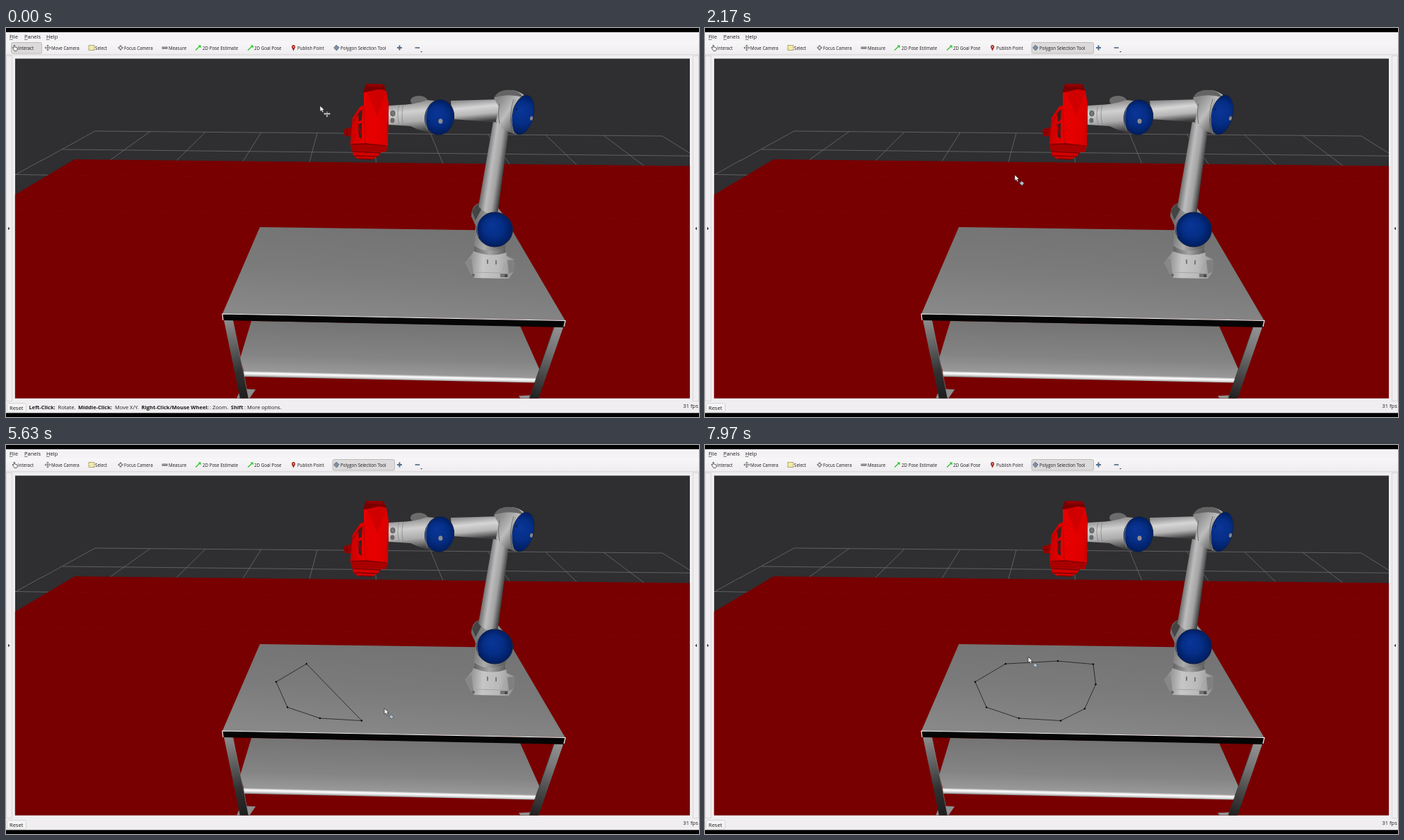
An HTML page with a canvas that plays this animation: 980x551 px, repeating every 8 s.

```html
<!DOCTYPE html>
<html lang="en">
<head>
<meta charset="utf-8">
<title>Polygon selection</title>
<style>
html, body { margin: 0; width: 100%; height: 100%; overflow: hidden; background: #000; }
canvas { display: block; width: 980px; height: 551px; }
</style>
</head>
<body>
<canvas id="stage" width="980" height="551"></canvas>
<script>
const LOOP = 8000, TOOL_CLICK = 1450;
const VIEW = [12.8, 43.2, 954.3, 481.4];
const stage = document.getElementById('stage').getContext('2d');
const FONT = '"Open Sans", "Noto Sans", sans-serif';
let c;

// Drawing helpers
function shape(d, fill, line, width = 1) {
  const p = new Path2D(d);
  if (fill) { c.fillStyle = fill; c.fill(p); }
  if (line) { c.strokeStyle = line; c.lineWidth = width; c.stroke(p); }
}
function rect(x, y, w, h, fill) { c.fillStyle = fill; c.fillRect(x, y, w, h); }
function oval(x, y, rx, ry, fill, turn = 0, line) {
  c.beginPath();
  c.ellipse(x, y, rx, ry, turn, 0, Math.PI * 2);
  c.fillStyle = fill;
  c.fill();
  if (line) { c.strokeStyle = line; c.lineWidth = 1; c.stroke(); }
}
function stops(g, colors) {
  colors.forEach((col, i) => g.addColorStop(i / (colors.length - 1), col));
  return g;
}
const lin = (x0, y0, x1, y1, ...cols) => stops(c.createLinearGradient(x0, y0, x1, y1), cols);
function text(s, x, y, size, bold) {
  c.font = `${bold ? 'bold ' : ''}${size}px ${FONT}`;
  c.fillStyle = '#1c1c1c';
  c.fillText(s, x, y);
}

function drawRoom() {
  rect(...VIEW, '#2f2e31');
  const grid = '#747476';
  for (let i = 0; i <= 10; i++) {
    const x = 126 + 77.4 * i + 0.28 * i * i, y = 146 + 0.7 * i;
    shape(`M${x} ${y}L${50 + 94.7 * i} ${188 + 0.8 * i}`, null, grid, 0.7);
  }
  shape('M126 146L928 153M80 172L990 181.5M13 207.5L75 208.5M51 187L13 208', null, grid, 0.7);
  shape('M97 186L968 195.5V525H12V236.5Z', '#780000');
  c.setLineDash([14, 5, 3, 7]);
  shape('M76 208.5L967 218M13 258L967 271', null, 'rgba(160,25,25,.28)', 0.7);
  c.setLineDash([]);
}

function drawTable() {
  shape('M326 525L332 511L353 512L344 525Z', '#8d8d8d');
  shape('M725 521L748 520L742 525H728Z', '#929292');
  shape('M347 415L727 422L755 485L750 496L337 488L331 468Z',
    lin(530, 418, 528, 492, '#747474', '#7c7c7c', '#848484', '#9a9a9a'));
  shape('M336 486L750 495.5L749 502.5L337 494Z',
    lin(500, 489.5, 499.8, 498, '#a6a6a6', '#fff', '#d4d4d4', '#747474'));
  shape('M308 413L321 414L343 525H331Z', lin(310, 415, 340, 524, '#8c8c8c', '#606060', '#303030', '#1d1d1d'));
  shape('M321 415L343 524', null, '#8b8b8b', 0.6);
  shape('M775 423L788 424L753 525H740Z', lin(782, 424, 747, 524, '#929292', '#747474', '#494949', '#202020'));
  shape('M775 424L740 524', null, '#333', 0.7);
  shape('M359 282L716 287L790.5 414L306 405Z',
    lin(520, 284, 510, 412, '#747474', '#7b7b7b', '#888'));
  shape('M306 405L791 414.5L789 424L307 414Z', '#050505');
  shape('M307 414L306 405L791 414.5L789 423', null, '#f3f3f3', 1.2);
}

function blueCap(x, y, rx, ry, turn) {
  const g = c.createRadialGradient(x - 4, y - 6, 2, x, y, Math.max(rx, ry));
  oval(x, y, rx, ry, stops(g, ['#0a3596', '#052e86', '#001c5c']), turn, '#17233f');
}

function drawArm() {
  // Base
  shape('M663 306L706 309L708 323L719 328L718 345L711 355L662 354L649 332L660 319Z',
    lin(652, 330, 719, 335, '#858585', '#c6c6c6', '#bababa', '#929292'));
  shape('M649 332L658 326L662 354L656 347Z', '#888');
  shape('M663 306L706 309L707 318Q686 326 661 316Z', lin(661, 310, 707, 312, '#606060', '#a5a5a5', '#5c5c5c'));
  shape('M662 346L701 347L706 334L717 332', null, '#a0a0a0', 0.8);
  shape('M709 329L719 328L718 345L711 348Z', '#808080');
  shape('M681 328v6M693 329v6', null, '#777', 2);
  rect(699, 348, 11, 5, '#737373');
  oval(661, 350, 2, 2, '#666');
  oval(707, 351, 2, 2, '#444');
  // Shoulder and upper arm
  shape('M658 267Q658 249 673 247L694 253L704 265L707 310Q679 322 662 308L664 280Z',
    lin(660, 280, 705, 290, '#6c6c6c', '#adadad', '#666'));
  shape('M659 260Q664 247 676 247L671 259L664 272Z', '#444');
  shape('M689 132L712 136L695 265Q680 266 668 253Z',
    lin(676, 205, 703, 209, '#707070', '#bdbdbd', '#a2a2a2', '#3c3c3c'));
  // Elbow and forearm
  shape('M629 103L699 101L699 134L631 129Z',
    lin(660, 102, 663, 133, '#929292', '#d6d6d6', '#b5b5b5', '#3e3e3e'));
  shape('M690 99Q696 88 711 88Q724 87 735 97L722 151Q700 145 693 132L697 112Z',
    lin(694, 105, 728, 130, '#8a8a8a', '#bdbdbd', '#606060'));
  shape('M690 99Q697 86 714 88Q727 89 731 98Q710 92 690 99Z', '#646464');
  shape('M698 107Q695 120 698 136M718 101Q711 121 715 145', null, '#686868', 0.9);
  blueCap(731, 123, 15, 28.5, 0.24);
  shape('M721 101Q711 125 718 149', null, '#8c8c8c', 0.8);
  oval(743, 128, 2, 3, '#858585', 0.2);
  oval(722, 115, 1, 1.4, '#061a48');
  blueCap(691, 285.5, 25.5, 24.5, 0);
  shape('M668 296Q661 274 679 263', null, '#999', 0.7);
  // Wrist
  oval(584, 103, 12, 7, '#6b6b6b');
  shape('M541 110L556 109Q576 109 596 102L614 104L607 150Q588 147 572 139L541 137Z',
    lin(570, 104, 574, 147, '#8c8c8c', '#d0d0d0', '#adadad', '#444'));
  shape('M556 109Q552 122 556 137M562 109Q558 122 562 138', null, '#888', 0.8);
  oval(547, 121, 3.2, 3.8, '#777', 0, '#555');
  oval(546.5, 131, 3, 3.4, '#696969');
  blueCap(613, 126.5, 20.5, 25, 0.15);
  shape('M601 104Q589 122 596 145', null, '#999', 0.7);
  oval(614.5, 132, 3, 3.5, '#8c8c8c');
  oval(598, 131, 1, 1, '#071b48');
  oval(628, 112, 1, 1, '#071b48');
}

function drawGripper() {
  shape('M477 144L489 140L490 154L479 153Z', '#980000');
  shape('M482 143v10M477 148h8', null, '#700000', 0.8);
  shape('M506 91L510 79L534 80L538 90L541 107L540 167L537 176L489 174L487 164L490 127L501 111L506 110Z',
    lin(488, 130, 541, 134, '#c80000', '#e40000', '#e60000', '#d80000'));
  shape('M505 91L509 79L534 80L538 89L527 87L510 91Z', '#780000');
  shape('M509 79L534 80L532 84L511 83Z', '#900000');
  shape('M511 92L525 125L538 91L527 87Z', '#d00000');
  shape('M498 121L504 115L503 130L499 133ZM498 137L503 134L503 157L499 154Z', '#3c2020');
  shape('M491 133L501 116M497 135L503 151', null, '#a80000', 1.4);
  shape('M506 112L508 163M541 106L538 160', null, '#c00000', 1);
  shape('M488 164L509 163L539 167L537 176L489 174Z', '#a80000');
  shape('M488 165L509 164L539 167', null, '#700000', 1.2);
  shape('M490 174L530 176L526 182L518 186L499 186L491 181Z', '#d40000');
  shape('M490 175L530 177M492 181L526 182M499 185L518 186', null, '#800000', 1.3);
}

const TOOLS = [
  ['Interact', 17], ['Move Camera', 64], ['Select', 126], ['Focus Camera', 167],
  ['Measure', 230], ['2D Pose Estimate', 278], ['2D Goal Pose', 351],
  ['Publish Point', 412], ['Polygon Selection Tool', 473]
];

function button(x, w, fill, line) {
  c.beginPath();
  c.roundRect(x + 0.5, 20.5, w, 15.5, 2);
  c.fillStyle = fill;
  c.fill();
  c.strokeStyle = line;
  c.lineWidth = 0.8;
  c.stroke();
}

function drawIcons() {
  shape('M11 31L9 27.5L11 28V24.5L12.5 24.5V27L16 28V31L15 32.5H12Z', '#fafafa', '#454545', 0.8);
  shape('M55 28H63M59 24V32M57.5 25.5L59 24L60.5 25.5M57.5 30.5L59 32L60.5 30.5M56.5 26.5L55 28L56.5 29.5M61.5 26.5L63 28L61.5 29.5', null, '#565656', 0.8);
  c.setLineDash([1.5, 1]);
  shape('M117 24.5H125V31.5H117Z', '#f3e9a6', '#655d35', 0.8);
  c.setLineDash([]);
  oval(162, 28, 2.4, 2.4, '#eee', 0, '#777');
  shape('M158 28H161M163 28H166M162 24V27M162 29V32', null, '#666', 0.9);
  rect(220.5, 26.5, 8, 3.2, '#777');
  shape('M222 27v1.3M224 27v1.3M226 27v1.3', null, '#eee', 0.6);
  for (const x of [268, 342]) {
    shape(`M${x} 31.5L${x + 7} 25M${x + 4} 25H${x + 7}V28`, null, '#26c526', 1.2);
  }
  shape('M406.5 32.5L404 27.5Q403.7 24 406.5 24Q409.3 24 409 27.5Z', '#a62a20');
  oval(406.5, 26.7, 1, 1, '#e9c3bd');
  shape('M463.7 28L467 24.3L471 27.7L467.5 32Z', '#7f91a8', '#4c5b70', 0.8);
  shape('M553 28H560M556.5 24.5V31.5', null, '#55708d', 2);
  shape('M578.5 28H585', null, '#63768a', 1.8);
  shape('M586 33H589L587.5 34.6Z', '#444');
}

function drawWindow(polygonMode, hover) {
  rect(0, 0, 980, 551, '#000');
  rect(0, 6, 980, 539.3, '#f0eef0');
  rect(0, 6, 980, 12, '#f4f2f4');
  rect(0, 18, 980, 20, lin(0, 18, 0, 38, '#f8f7f8', '#efedef'));
  rect(0, 37.5, 980, 0.8, '#cfccce');
  for (const x of [0.5, 971.5]) {
    c.strokeStyle = '#d4d1d3';
    c.lineWidth = 0.8;
    c.strokeRect(x, 39.5, 8, 489);
  }
  shape('M3 281.8L5.5 284L3 286.2Z', '#333');
  shape('M977 281.8L974.5 284L977 286.2Z', '#333');

  [['File', 5], ['Panels', 26], ['Help', 57]].forEach(([s, x]) => {
    text(s, x, 15, 7.5);
    rect(x, 16, 4.5, 0.6, '#333');
  });
  if (polygonMode) button(461.5, 87.5, '#dcdadb', '#b4b0b2');
  else {
    button(7, 43, '#dcdadb', '#b4b0b2');
    if (hover) button(461.5, 87.5, '#f8f7f7', '#c6c2c4');
  }
  TOOLS.forEach(([s, x]) => text(s, x, 30.5, 6.2));
  drawIcons();

  c.beginPath();
  c.roundRect(1.5, 531.5, 27, 12.5, 2);
  c.fillStyle = '#f5f4f5';
  c.fill();
  c.strokeStyle = '#d0cdcf';
  c.lineWidth = 0.8;
  c.stroke();
  text('Reset', 5, 540.5, 7.5);
  text('31 fps', 957.5, 538.3, 7.5);
  if (!polygonMode) {
    [['Left-Click:', 32.5, 1], ['Rotate.', 73.5], ['Middle-Click:', 102, 1], ['Move X/Y.', 154],
     ['Right-Click/Mouse Wheel:', 191.5, 1], [': Zoom.', 288], ['Shift', 318, 1], [': More options.', 337]]
      .forEach(([s, x, bold]) => text(s, x, 539.5, 7.5, bold));
  }
}

function makeScene(polygonMode, hover) {
  const cv = document.createElement('canvas');
  cv.width = 980;
  cv.height = 551;
  c = cv.getContext('2d');
  drawWindow(polygonMode, hover);
  c.save();
  c.beginPath();
  c.rect(...VIEW);
  c.clip();
  drawRoom();
  drawTable();
  drawArm();
  drawGripper();
  c.restore();
  return cv;
}
const scenes = {
  idle: makeScene(false, false),
  hover: makeScene(false, true),
  polygon: makeScene(true, false)
};

// Pointer path: time, x, y
const PATH = [
  [0, 444, 110], [350, 444, 110], [870, 490, 39], [1120, 511, 28], [1500, 511, 28],
  [2170, 438, 208], [2700, 425, 309], [2900, 425, 309], [3450, 382, 335], [3700, 382, 335],
  [4250, 397, 371], [4420, 397, 371], [4750, 444, 386], [4870, 444, 386], [5180, 503, 390],
  [5340, 503, 390], [5630, 535, 373], [5710, 537, 373], [5870, 537, 373], [6230, 552, 339],
  [6380, 552, 339], [6530, 551, 320], [6700, 549, 310], [6850, 549, 310], [7250, 499, 306],
  [7430, 499, 306], [7970, 457, 300]
];
// Polygon corners: click time, x, y
const CLICKS = [
  [2800, 425, 310], [3600, 382, 335.5], [4350, 398, 371.5], [4810, 444, 387], [5270, 503, 390.5],
  [5720, 537, 373.5], [6310, 552.5, 339], [6780, 549, 310.5], [7350, 499, 306]
];

function pointerAt(t) {
  const i = PATH.findIndex(k => k[0] > t);
  if (i < 0) return PATH[PATH.length - 1].slice(1);
  const [t0, x0, y0] = PATH[i - 1], [t1, x1, y1] = PATH[i];
  const u = (t - t0) / (t1 - t0), e = u * u * (3 - 2 * u);
  return [x0 + (x1 - x0) * e, y0 + (y1 - y0) * e];
}

function drawPolygon(t) {
  const pts = CLICKS.filter(k => k[0] <= t);
  if (!pts.length) return;
  const d = 'M' + pts.map(p => p[1] + ' ' + p[2]).join('L') + (pts.length > 2 ? 'Z' : '');
  shape(d, null, '#1c1c1c', 0.8);
  pts.forEach(p => rect(p[1] - 1.1, p[2] - 1.1, 2.2, 2.2, '#080808'));
}

function drawPointer(x, y, polygonMode) {
  c.save();
  c.translate(x, y);
  shape('M0 0V8.4L2 6.7L3.6 10L5.2 9.2L3.7 6.2L6.3 6Z', '#fff', '#222', 0.7);
  if (y > 38) {
    if (polygonMode) shape('M6.8 11.8L9.8 8.8L13.3 12L10.2 15.2Z', '#b1bdca', '#465467', 0.8);
    else {
      const move = 'M6 11.5H14M10 8.5V15.5M7.5 10L6 11.5L7.5 13M12.5 10L14 11.5L12.5 13M8.7 14.3L10 15.6L11.3 14.3';
      shape(move, null, '#333', 1.8);
      shape(move, null, '#f2f2f2', 0.9);
    }
  }
  c.restore();
}

function render(t) {
  const polygonMode = t >= TOOL_CLICK;
  const [x, y] = pointerAt(t);
  const scene = polygonMode ? 'polygon' : y < 36 ? 'hover' : 'idle';
  c = stage;
  c.drawImage(scenes[scene], 0, 0);
  drawPolygon(t);
  drawPointer(x, y, polygonMode);
}

let start;
function tick(now) {
  start ??= now;
  render(Math.max(0, now - start) % LOOP);
  requestAnimationFrame(tick);
}
render(0);
requestAnimationFrame(tick);
</script>
</body>
</html>
```
